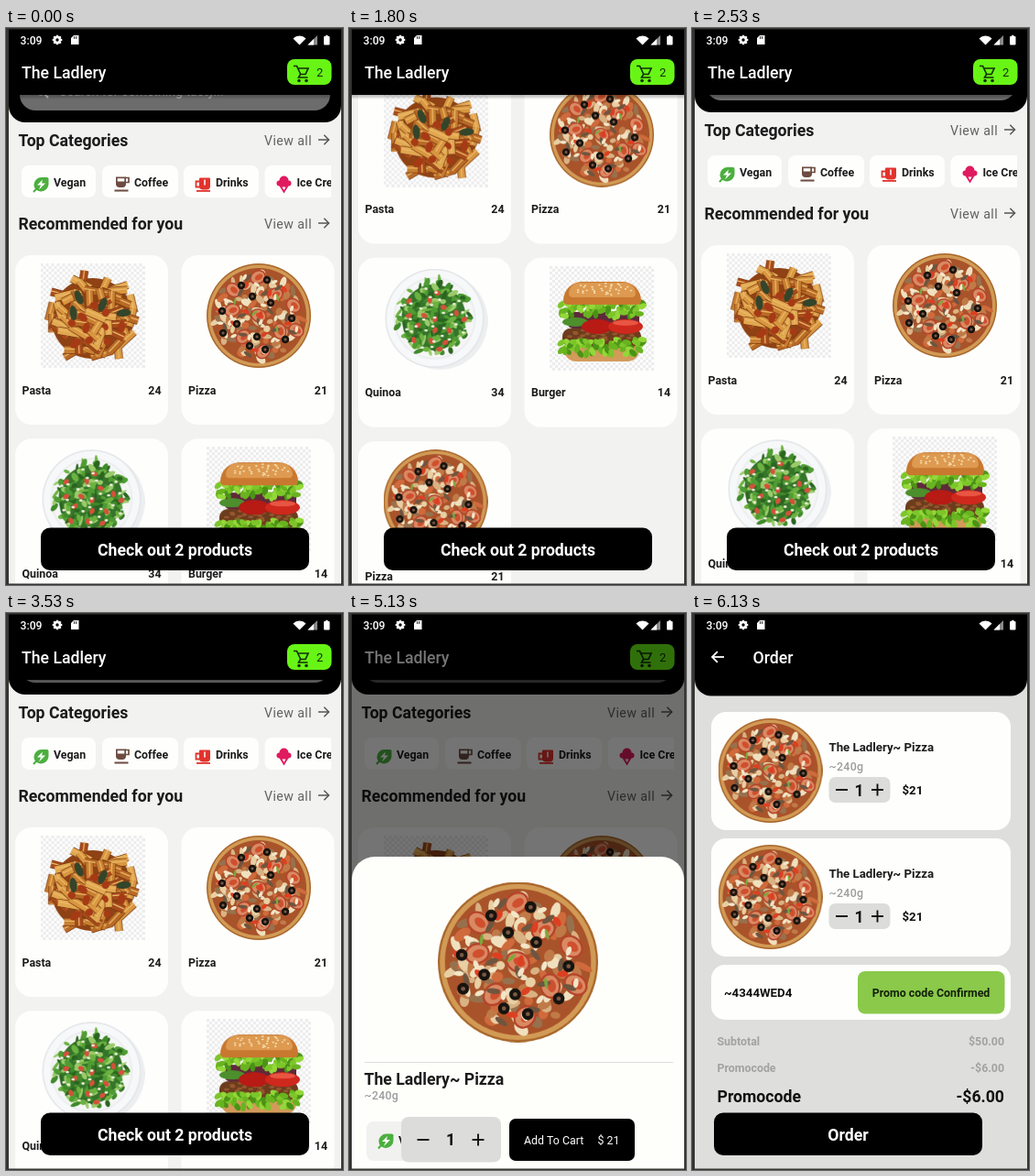
An HTML page with a canvas that plays this animation: 368x608 px, repeating every 8470 ms.

```html
<!DOCTYPE html>
<html lang="en">
<head>
<meta charset="utf-8">
<title>Food ordering app</title>
<style>
html, body { margin: 0; width: 100%; height: 100%; overflow: hidden; background: #000; }
canvas { display: block; width: 368px; height: 608px; }
</style>
</head>
<body>
<canvas id="stage"></canvas>
<script>
const W = 368, H = 608, LOOP = 8470, TICK = 1000 / 15;
const SHOP = 'The Ladlery';
const BIG = 17.66, MID = 13.25, SMALL = 12.36;
const DPR = Math.max(1, window.devicePixelRatio || 1);
const stage = document.getElementById('stage');
stage.width = W * DPR;
stage.height = H * DPR;
let ctx = stage.getContext('2d');
ctx.scale(DPR, DPR);

// Keys are [tick, value] pairs, joined by straight lines.
const SCROLL = [[15, 0], [16, 136], [17, 200], [18, 226], [25, 226], [32, 126], [38, 11], [39, 14]];
const SHEET = [[53, 0], [54, 0.62], [55, 0.97], [57, 0.97], [58, 1]];
const ORDER = [[80, 0], [81, 0.45], [82, 0.87], [83, 1]];

function track(keys, k) {
  if (k <= keys[0][0]) return keys[0][1];
  for (let i = 1; i < keys.length; i++) {
    const [a, va] = keys[i - 1], [b, vb] = keys[i];
    if (k <= b) return va + (vb - va) * (k - a) / (b - a);
  }
  return keys[keys.length - 1][1];
}

function random(seed) {
  seed *= 7919;
  return () => (seed = (seed * 16807) % 2147483647) / 2147483647;
}

function box(x, y, w, h, r, fill) {
  ctx.beginPath();
  ctx.roundRect(x, y, w, h, r);
  ctx.fillStyle = fill;
  ctx.fill();
}

function oval(x, y, rx, ry, fill, turn = 0) {
  ctx.beginPath();
  ctx.ellipse(x, y, rx, ry, turn, 0, 7);
  ctx.fillStyle = fill;
  ctx.fill();
}

const dot = (x, y, r, fill) => oval(x, y, r, r, fill);

function shape(pts, fill) {
  ctx.beginPath();
  pts.forEach(([x, y]) => ctx.lineTo(x, y));
  ctx.closePath();
  ctx.fillStyle = fill;
  ctx.fill();
}

function line(pts, color, width) {
  ctx.beginPath();
  pts.forEach(([x, y], i) => i ? ctx.lineTo(x, y) : ctx.moveTo(x, y));
  ctx.strokeStyle = color;
  ctx.lineWidth = width;
  ctx.stroke();
}

function text(str, x, y, size, weight, color, align = 'left', spacing = 0) {
  ctx.font = `${weight} ${size}px Roboto, Arial, sans-serif`;
  ctx.letterSpacing = spacing + 'px';
  ctx.textAlign = align;
  ctx.fillStyle = color;
  ctx.fillText(str, x, y);
}

function sprite(w, h, scale, draw) {
  const c = document.createElement('canvas'), old = ctx;
  c.width = w * scale;
  c.height = h * scale;
  ctx = c.getContext('2d');
  ctx.scale(scale, scale);
  draw();
  ctx = old;
  return c;
}

// Spreads n items evenly over an oval, from the rim to the middle.
function scatter(n, seed, cx, cy, rx, ry, put) {
  const rnd = random(seed);
  for (let i = 0; i < n; i++) {
    const a = seed + i * 2.4 + rnd() * 0.5, d = Math.sqrt(1 - (i + rnd()) / n);
    put(cx + Math.cos(a) * d * rx, cy + Math.sin(a) * d * ry, rnd, i);
  }
}

// Food pictures, each on a 114 x 114 tile.
function checker() {
  ctx.fillStyle = '#fdfdfd';
  ctx.fillRect(0, 0, 114, 114);
  ctx.fillStyle = '#ececec';
  for (let i = 0; i < 38; i++)
    for (let j = i % 2; j < 38; j += 2) ctx.fillRect(j * 3, i * 3, 3, 3);
}

function pasta() {
  checker();
  oval(57, 60, 45, 44, '#8f4214');
  const tones = ['#d9973f', '#c97f30', '#e2a850', '#b96a26', '#a84a1a'];
  scatter(58, 7, 57, 59, 47, 44, (x, y, rnd, i) => {
    const a = rnd() * 3.14, dx = Math.cos(a) * 12, dy = Math.sin(a) * 10;
    line([[x - dx, y - dy], [x + dx, y + dy]], '#7c3a12', 9);
    line([[x - dx, y - dy], [x + dx, y + dy]], tones[i % 5], 7.5);
    line([[x - dx, y - dy - 1], [x + dx, y + dy - 1]], '#eab968', 1.3);
  });
  scatter(10, 31, 57, 68, 32, 26, (x, y, rnd) => oval(x, y, 3 + rnd() * 4, 4, '#a63a15', rnd() * 3));
  for (const [x, y] of [[42, 37], [68, 45], [36, 54], [91, 54]]) oval(x, y, 8, 4, '#33452a', x);
}

function pizza() {
  dot(57, 57, 57, '#a8662a');
  dot(57, 57, 55.5, '#d19a55');
  dot(57, 57, 52, '#a9532a');
  const tops = ['#e8cfa4', '#c07a48', '#f0e0be', '#97714e', '#cf6a3c', '#d9b283'];
  scatter(110, 9, 57, 57, 48, 48, (x, y, rnd, i) =>
    oval(x, y, 3 + rnd() * 4, 2 + rnd() * 2, tops[i % 6], rnd() * 3));
  for (const [x, y] of [[29, 29], [75, 34], [28, 51], [95, 46], [57, 57], [80, 74], [40, 80], [98, 73], [56, 15], [62, 96]]) {
    oval(x, y, 9, 7.5, '#b5432a', x);
    oval(x, y, 7.5, 6, '#d98a63', x);
    oval(x + 1, y, 4.5, 3, '#cf4f2e', x);
  }
  scatter(14, 52, 57, 57, 45, 45, (x, y, rnd) => oval(x, y, 5, 2, '#6f553f', rnd() * 3));
  scatter(10, 204, 57, 57, 44, 44, (x, y, rnd) => oval(x, y, 4, 2.2, '#dd3f22', rnd() * 3));
  scatter(18, 23, 57, 57, 46, 46, (x, y, rnd) => oval(x, y, 3.5, 1.8, '#f3e6c8', rnd() * 3));
  scatter(4, 7, 57, 45, 36, 36, (x, y, rnd) => oval(x, y, 4, 1.2, '#7ba83a', rnd() * 3));
  for (const [x, y] of [[50, 36], [70, 43], [17, 52], [93, 60], [18, 76], [47, 90], [64, 94], [86, 83], [55, 80], [66, 18], [38, 24], [33, 66]]) {
    dot(x, y, 4.2, '#17130f');
    dot(x, y, 1.5, '#7a5a44');
  }
}

function quinoa() {
  oval(62, 60, 52, 53, '#eceef0');
  dot(56, 57, 54, '#e3e5e8');
  dot(56, 57, 52.5, '#f7f8f9');
  dot(56, 57, 45, '#eceef0');
  dot(56, 57, 43, '#f5f6f5');
  const greens = ['#3f8a2a', '#6cb240', '#2a6520', '#9acb6b', '#4f9c33'];
  oval(55, 56, 35, 36, '#35742a');
  scatter(130, 15, 55, 56, 41, 41, (x, y, rnd, i) =>
    oval(x, y, 3 + rnd() * 4, 1.3 + rnd() * 2, greens[i % 5], rnd() * 3));
  scatter(16, 83, 55, 58, 36, 34, (x, y, rnd) => oval(x, y, 3.6, 2.6, '#d4513a', rnd() * 3));
  scatter(30, 41, 55, 56, 37, 36, (x, y) => box(x, y, 3.5, 2.5, 1, '#eeeedd'));
}

function frill(y, seed) {
  const rnd = random(seed);
  for (let i = 0; i < 54; i++)
    oval(13 + (i % 27) * 3.4, y + rnd() * 16 - 8, 5, 3, ['#68b41f', '#93d838', '#4a9316', '#7cc62a'][i % 4], rnd() * 3);
}

function burger() {
  checker();
  box(16, 88, 82, 16, [4, 4, 14, 14], '#d39a5a');
  box(14, 68, 86, 20, 9, '#6d3c1d');
  scatter(24, 8, 57, 75, 40, 6, (x, y) => oval(x, y, 3, 1.4, '#94582e'));
  frill(88, 12);
  box(20, 50, 78, 18, 5, '#5e2a3a');
  oval(28, 61, 14, 5, '#4c8f2c');
  oval(52, 66, 17, 8, '#b81a14');
  oval(83, 66, 19, 8, '#cf281c');
  oval(83, 62, 14, 3, '#e85643');
  frill(47, 61);
  box(15, 17, 85, 25, [38, 38, 8, 8], '#c9782f');
  box(21, 18, 73, 16, [30, 30, 9, 9], '#dd9a50');
  scatter(34, 19, 58, 25, 32, 7, (x, y) => oval(x, y, 1.3, 0.8, '#f8e4b8'));
}

const pics = {};
for (const draw of [pasta, pizza, quinoa, burger])
  pics[draw.name] = sprite(114, 114, 2 * DPR, draw);

function pic(name, x, y, size = 114) {
  ctx.imageSmoothingQuality = 'high';
  ctx.drawImage(pics[name], x, y, size, size);
}

// Icons
function arrow(x, y, dir, len, color, width) {
  line([[x, y], [x + dir * len, y]], color, width);
  const t = x + dir * len, w = len * 0.45;
  line([[t - dir * w, y - w], [t, y], [t - dir * w, y + w]], color, width);
}

function leaf(x, y) {
  box(x - 7.5, y - 7.5, 16, 15.5, [9, 2, 9, 8], '#4caf3f');
  line([[x - 8, y + 8.5], [x - 3, y + 3]], '#4caf3f', 2);
  shape([[x + 2, y - 5], [x - 4, y + 1], [x, y + 1], [x - 2, y + 6], [x + 5, y - 1], [x + 1, y - 1]], '#fff');
}

function coffee(x, y) {
  const brown = '#6d4c41';
  box(x - 6, y - 8, 11, 11.5, [0, 0, 4, 4], brown);
  ctx.fillStyle = '#fff';
  ctx.fillRect(x - 4.3, y - 6.3, 7.6, 3.3);
  line([[x + 4, y - 7], [x + 8, y - 7], [x + 8, y - 2], [x + 4, y - 2]], brown, 1.7);
  ctx.fillStyle = brown;
  ctx.fillRect(x - 7.5, y + 6, 15, 2);
}

function drink(x, y) {
  box(x - 4, y - 7, 12, 13, [1, 1, 4, 4], '#e2332d');
  line([[x - 4, y - 3], [x - 7.5, y - 3], [x - 7.5, y + 3], [x - 3, y + 3]], '#e2332d', 1.8);
  ctx.fillRect(x - 7, y + 6.5, 15, 1.8);
  line([[x + 2, y - 5], [x + 2, y + 1]], '#fff', 1.5);
}

function cone(x, y) {
  dot(x, y - 4, 5, '#e01a5e');
  box(x - 8, y - 4, 16, 6, 3, '#e01a5e');
  shape([[x - 5.5, y + 1], [x + 5.5, y + 1], [x, y + 10]], '#e01a5e');
  shape([[x - 2, y + 3], [x + 2, y + 3], [x, y + 6.5]], '#fff');
}

function cart(x, y) {
  line([[x, y], [x + 3.5, y], [x + 8, y + 9.5]], '#123004', 1.7);
  line([[x + 4, y + 2.5], [x + 16, y + 2.5], [x + 13, y + 9], [x + 7.5, y + 9], [x + 5.5, y + 12.5], [x + 15.5, y + 12.5]], '#123004', 1.7);
  dot(x + 6, y + 16, 1.8, '#123004');
  dot(x + 14, y + 16, 1.8, '#123004');
}

function minus(x, y, r) {
  line([[x - r, y], [x + r, y]], '#111', 1.9);
}

function plus(x, y, r) {
  minus(x, y, r);
  line([[x, y - r], [x, y + r]], '#111', 1.9);
}

function statusBar() {
  text('3:09', 15.5, 17.5, 12.2, 500, '#fff');
  for (let i = 0; i < 4; i++) {
    const c = Math.cos(i * 0.785) * 5.3, s = Math.sin(i * 0.785) * 5.3;
    line([[56 - c, 13 - s], [56 + c, 13 + s]], '#fff', 2.4);
  }
  dot(56, 13, 4.2, '#fff');
  dot(56, 13, 1.7, '#000');
  shape([[74, 8], [79.5, 8], [79.5, 18], [71, 18], [71, 11]], '#fff');
  line([[74.5, 9], [74.5, 12]], '#000', 0.8);
  line([[76.5, 9], [76.5, 12]], '#000', 0.8);
  ctx.beginPath();
  ctx.moveTo(320.5, 18.5);
  ctx.arc(320.5, 18.5, 10, -2.35, -0.79);
  ctx.fillStyle = '#fff';
  ctx.fill();
  shape([[340, 8], [340, 18.5], [329.5, 18.5]], '#8a8a8a');
  shape([[336, 12], [336, 18.5], [329.5, 18.5]], '#fff');
  box(347, 9, 6.5, 9.5, 1, '#fff');
  ctx.fillRect(349, 7.8, 2.5, 2);
}

function bezel() {
  ctx.fillStyle = '#343632';
  ctx.fillRect(0, 0, W, 1.5);
  ctx.fillRect(0, 0, 3, H);
  ctx.fillRect(366, 0, 2, H);
  ctx.fillRect(0, 606.5, W, 1.5);
}

function button(label, x) {
  box(x, 545.5, 293, 46.5, 10, '#000');
  text(label, x + 146.5, 576, BIG, 700, '#fff', 'center');
}

function heading(label, y) {
  text(label, 13.5, y, BIG, 700, '#1b1b1b');
  text('View all', 282, y - 1.5, 14.13, 400, '#616161', 'left', 0.44);
  arrow(341, y - 7, 1, 11.5, '#555', 1.5);
}

function chip(x, y, w, icon, label) {
  box(x, y, w, 35, 8, '#fefefd');
  icon(x + 21, y + 20.5);
  text(label, x + 35, y + 22.5, SMALL, 700, '#1b1b1b');
}

function card(col, row, name, price) {
  const x = 10 + col * 181.5, y = 248 + row * 200.3;
  box(x, y, 167, 185, 18, '#fefefd');
  pic(name.toLowerCase(), x + 27.5, y + 9);
  text(name, x + 7.5, y + 151.5, SMALL, 700, '#1b1b1b');
  text(price, x + 159.5, y + 151.5, SMALL, 700, '#1b1b1b', 'right');
}

function home(scroll) {
  ctx.fillStyle = '#f2f2f1';
  ctx.fillRect(0, 0, W, H);
  ctx.save();
  ctx.translate(0, -scroll);
  box(3, 0, 363, 103, [0, 0, 18, 18], '#000');
  box(15, 50, 339, 40, 17, '#6c6c6c');
  ctx.beginPath();
  ctx.arc(38, 68, 5, 0, 7);
  ctx.strokeStyle = '#c4c4c4';
  ctx.lineWidth = 1.6;
  ctx.stroke();
  line([[41.5, 71.5], [46, 76]], '#c4c4c4', 1.8);
  text('Search for something tasty...', 58, 74, 14.13, 400, '#b5b5b5');
  heading('Top Categories', 129);
  ctx.save();
  ctx.beginPath();
  ctx.rect(14, 140, 341, 60);
  ctx.clip();
  chip(17, 150, 81, leaf, 'Vegan');
  chip(105, 150, 83, coffee, 'Coffee');
  chip(194, 150, 82, drink, 'Drinks');
  chip(282.5, 150, 100, cone, 'Ice Cream');
  ctx.restore();
  heading('Recommended for you', 220);
  card(0, 0, 'Pasta', '24');
  card(1, 0, 'Pizza', '21');
  card(0, 1, 'Quinoa', '34');
  card(1, 1, 'Burger', '14');
  card(0, 2, 'Pizza', '21');
  ctx.restore();

  const shade = ctx.createLinearGradient(0, 72, 0, 78);
  shade.addColorStop(0, 'rgba(0,0,0,.35)');
  shade.addColorStop(1, 'rgba(0,0,0,0)');
  ctx.fillStyle = shade;
  ctx.fillRect(0, 72, W, 6);
  ctx.fillStyle = '#000';
  ctx.fillRect(0, 0, W, 73);
  text(SHOP, 17, 54.5, BIG, 500, '#fff');
  box(307, 34, 48.5, 28, 8, '#68f516');
  cart(314, 41.5);
  text('2', 339, 53, 13, 400, '#123004');
  button('Check out 2 products', 38);
}

function sheet(p) {
  ctx.fillStyle = `rgba(0,0,0,${0.54 * p})`;
  ctx.fillRect(0, 0, W, H);
  ctx.save();
  ctx.translate(0, (1 - p) * 342);
  box(3, 266, 363, 345, [25, 25, 0, 0], '#fefefb');
  pic('pizza', 97, 293.5, 175);
  ctx.fillStyle = '#dededc';
  ctx.fillRect(17, 490, 337, 1);
  text(SHOP + '~ Pizza', 16.5, 514.5, BIG, 700, '#1b1b1b');
  text('~240g', 16.5, 530.5, SMALL, 500, '#9c9c9c', 'left', 0.22);
  box(19, 555, 82, 43, 8, '#f1f1ef');
  leaf(40, 576);
  text('Vegan', 54, 580, SMALL, 700, '#1b1b1b');
  box(57, 550, 109, 49.5, 8, '#dcdcdb');
  minus(81, 575, 6.5);
  text('1', 111, 581, BIG, 700, '#111', 'center');
  plus(141, 575, 6.5);
  box(175, 552, 137, 46, 7, '#000');
  text('Add To Cart', 191, 579.5, SMALL, 400, '#fff');
  text('$ 21', 271.5, 579.5, SMALL, 400, '#fff');
  ctx.restore();
}

function orderItem(y) {
  box(21, y, 327, 129, 16, '#fefefd');
  pic('pizza', 28.5, y + 7);
  text(SHOP + '~ Pizza', 149.5, y + 43, MID, 700, '#1b1b1b');
  text('~240g', 149.5, y + 63.5, SMALL, 500, '#9c9c9c', 'left', 0.3);
  box(149.5, y + 71, 67, 28, 7, '#dcdcdb');
  minus(163.5, y + 85, 6.5);
  text('1', 182.5, y + 91.5, BIG, 700, '#111', 'center');
  plus(202.5, y + 85, 6.5);
  text('$21', 229.5, y + 90, MID, 700, '#111');
}

function sumRow(label, value, y, size, color) {
  text(label, 27.5, y, size, 700, color);
  text(value, 341, y, size, 700, color, 'right');
}

function order() {
  ctx.fillStyle = '#dededd';
  ctx.fillRect(0, 0, W, H);
  box(3, 0, 363, 90.5, [0, 0, 18, 18], '#000');
  arrow(35, 48, -1, 13, '#fff', 1.8);
  text('Order', 66.5, 54.5, BIG, 500, '#fff');
  orderItem(108);
  orderItem(246);
  box(21, 384, 327, 60, 15, '#fefefd');
  text('~4344WED4', 35, 419, MID, 700, '#111');
  box(181, 391, 160.5, 46.5, 8, '#8ac94a');
  text('Promo code Confirmed', 261, 419, SMALL, 700, '#13200a', 'center');
  sumRow('Subtotal', '$50.00', 472, SMALL, '#a2a2a1');
  sumRow('Promocode', '-$6.00', 500.5, SMALL, '#a2a2a1');
  sumRow('Promocode', '-$6.00', 533.5, BIG, '#111');
  button('Order', 24);
}

const orderPage = sprite(W, H, DPR, order);

function render(t) {
  const k = Math.floor((t + 4) / TICK);
  const up = track(SHEET, k), page = track(ORDER, k);
  if (page < 1) {
    home(track(SCROLL, k));
    if (up > 0) sheet(up);
  }
  if (page > 0) {
    ctx.globalAlpha = page;
    ctx.drawImage(orderPage, 0, (1 - page) * 40, W, H);
    ctx.globalAlpha = 1;
  }
  statusBar();
  bezel();
}

let start;
function frame(now) {
  start ??= now;
  render((now - start) % LOOP);
  requestAnimationFrame(frame);
}
requestAnimationFrame(frame);
</script>
</body>
</html>
```
